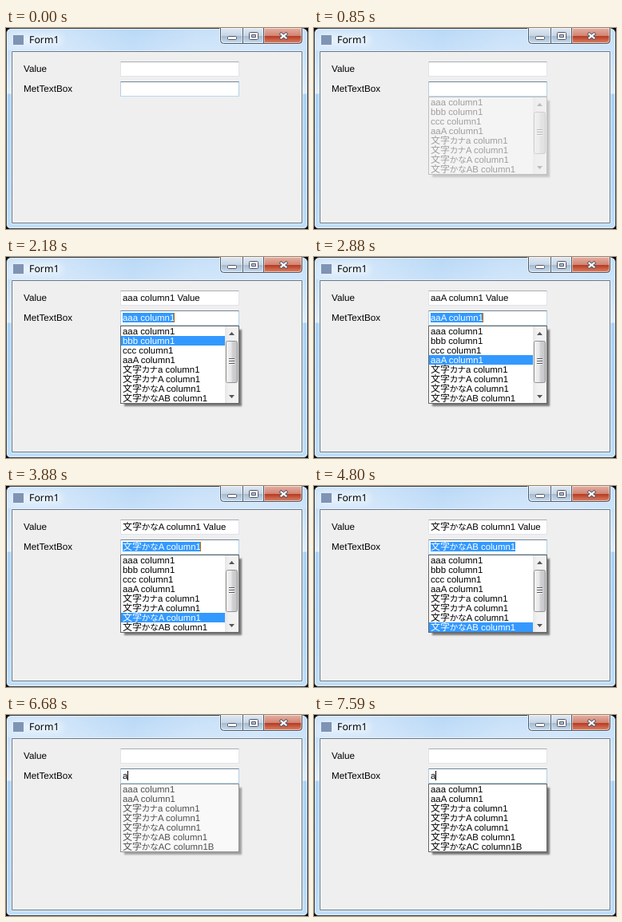
These frames come from a looping animation (378 by 252 pixels, 8 s). An HTML page with a canvas:

```html
<!DOCTYPE html>
<html lang="ja">
<head>
<meta charset="utf-8">
<title>Form1</title>
<style>
html, body { margin: 0; width: 100%; height: 100%; overflow: hidden; background: #000; }
body {
  position: relative;
  font: 11.4px/14px "Liberation Sans", "Noto Sans CJK JP", sans-serif;
  color: #000;
  text-rendering: geometricPrecision;
}
body > *, #bar, #caret { position: absolute; }
canvas { display: block; }
div { white-space: pre; }
.kanji, .kana {
  font: 12px/0 "Noto Sans CJK JP", "Noto Sans CJK", sans-serif;
  font-feature-settings: "palt";
}
.kana { font-size: 10.6px; }
#win { left: 0; top: 0; }
#title { left: 29px; top: 7px; font: 12.3px/16px "Noto Sans", sans-serif; }
.label { left: 22px; font-size: 11.7px; }
.box {
  left: 143px; width: 149px; height: 19px; box-sizing: border-box;
  background: #fff; border: 1px solid #e2e3ea; border-top-color: #abadb3; border-radius: 1px;
}
.box.focus { border-color: #71879c #b5cfe7 #b7d9ed; }
.text { left: 146px; height: 12px; }
.on { background: #39f; color: #fff; }
#caret { top: 0; width: 1px; height: 12px; background: #000; }
.on #caret { right: 0; background: #c60; }
#popup {
  left: 143px; top: 86px; width: 147px; border: 1px solid #646464;
  background: #fff; box-shadow: 4px 4px 2px -1px rgba(0, 0, 0, .5);
}
.row { height: 12px; padding-left: 2px; }
.long .row { margin-right: 17px; }
#bar { right: 0; top: 0; }
</style>
</head>
<body>
<canvas id="win" width="378" height="252"></canvas>
<div id="title">Form1</div>
<div class="label" style="top:45px">Value</div>
<div class="label" style="top:70px">MetTextBox</div>
<div class="box" style="top:42px"></div>
<div class="box focus" style="top:67px"></div>
<div class="text" id="value" style="top:45px"></div>
<div class="text" id="field" style="top:70px"><span id="typed"></span><i id="caret"></i></div>
<div id="popup"><div id="rows"></div><canvas id="bar" width="17" height="96"></canvas></div>
<script>
const LOOP = 8000;
const ITEMS = ['aaa', 'bbb', 'ccc', 'aaA', '文字カナa', '文字カナA', '文字かなA', '文字かなAB']
  .map(s => s + ' column1').concat('文字かなAC column1B');
const MATCHES = ITEMS.filter(s => /^aa|^文/.test(s));

const BLINK = [400, 850, 1420, 4800, 5290, 6120, 6580, 7130, 7590];
const PICK = [1780, 2180, 2480, 2800, 3280, 3580, 3880, 4290];
const FILL = [1780, 2260, 2480, 2880, 3280, 3580, 3880, 4290];
const OPEN = 850, CLOSE = 4880, CLEAR = 5670, TYPE = 6580;

const $ = id => document.getElementById(id);
const passed = (times, t) => times.filter(x => x <= t).length;
const markup = s => s
  .replace(/[\u4e00-\u9fff]+/g, '<span class="kanji">$&</span>')
  .replace(/[\u3040-\u30ff]+/g, '<span class="kana">$&</span>');

function setHtml(el, html) {
  if (el.shown !== html) el.innerHTML = el.shown = html;
}

function ramp(c, x0, y0, x1, y1, ...stops) {
  const g = c.createLinearGradient(x0, y0, x1, y1);
  stops.forEach(([at, color]) => g.addColorStop(at, color));
  return g;
}

function panel(c, x, y, w, h, radii, fill, line) {
  c.beginPath();
  c.roundRect(x + .5, y + .5, w - 1, h - 1, radii);
  c.fillStyle = fill;
  c.fill();
  c.strokeStyle = line;
  c.stroke();
}

function rect(c, color, x, y, w, h) {
  c.fillStyle = color;
  c.fillRect(x, y, w, h);
}

function drawWindow() {
  const c = $('win').getContext('2d');
  const white = a => `rgba(255,255,255,${a})`;
  const glass = ramp(c, 0, 0, 0, 252, [0, '#b9d8f6'], [.12, '#c6e0f9'], [.325, '#e0edfa'],
    [.33, '#abd2f8'], [.8, '#b4d8fa'], [1, '#c0def8']);
  panel(c, 0, 0, 378, 252, [6, 6, 5, 5], glass, '#33414f');
  panel(c, 1, 1, 376, 250, [5, 5, 4, 4], 'transparent', white(.65));

  // slanted sheen and a soft glow behind the caption
  rect(c, ramp(c, 0, 28, 376, 100, [0, white(.3)], [.2, white(.25)], [.4, white(0)],
    [.6, white(.2)], [.8, white(.25)], [1, white(.1)]), 2, 2, 374, 26);
  c.save();
  c.filter = 'blur(5px)';
  rect(c, white(.5), 8, 8, 62, 14);
  c.restore();
  rect(c, '#7f93b3', 9, 9, 13, 12);

  panel(c, 6, 28, 366, 218, 1, 'transparent', white(.6));
  panel(c, 7, 29, 364, 216, 0, '#efefef', '#66788b');

  const pale = ramp(c, 0, 0, 0, 19, [0, '#dfe9f3'], [.53, '#c6d5e4'], [.54, '#a5bacf'], [1, '#c8dcee']);
  const red = ramp(c, 0, 0, 0, 19, [0, '#e5b0a3'], [.53, '#d08371'], [.54, '#b73a22'], [1, '#d98468']);
  const button = (x, w, radii, fill) => {
    panel(c, x, -1, w, 21, radii, fill, '#4b5a6b');
    panel(c, x + 1, 0, w - 2, 19, radii, 'transparent', white(.5));
  };
  panel(c, 267, -1, 105, 22, [0, 0, 5, 5], 'transparent', white(.6));
  button(268, 29, [0, 0, 0, 4], pale);
  button(296, 27, 0, pale);
  button(322, 49, [0, 0, 4, 0], red);

  const ink = '#535666';
  panel(c, 277, 10, 12, 5, 1, '#fff', ink);
  panel(c, 304, 5, 12, 10, 1, '#fff', ink);
  panel(c, 307, 8, 6, 4, 0, '#b4c6d8', ink);
  for (const [color, width] of [[ink, 4], ['#fff', 2.2]]) {
    c.strokeStyle = color;
    c.lineWidth = width;
    c.lineCap = 'square';
    c.beginPath();
    c.moveTo(344.5, 7.5); c.lineTo(350.5, 12.5);
    c.moveTo(350.5, 7.5); c.lineTo(344.5, 12.5);
    c.stroke();
  }
}

function drawBar() {
  const c = $('bar').getContext('2d');
  rect(c, ramp(c, 0, 0, 17, 0, [0, '#e6e6e6'], [.3, '#f1f1f1'], [1, '#f3f3f3']), 0, 0, 17, 96);
  const arrow = (y, dir) => {
    c.fillStyle = '#555';
    c.beginPath();
    c.moveTo(5, y); c.lineTo(12, y); c.lineTo(8.5, y + 4 * dir);
    c.fill();
  };
  arrow(11, -1);
  arrow(86, 1);
  panel(c, 1, 18, 15, 53, 2,
    ramp(c, 1, 0, 16, 0, [0, '#f5f5f5'], [.48, '#e6e6e6'], [.52, '#d3d3d6'], [1, '#c2c3c7']), '#929292');
  for (let y = 40; y < 49; y += 3) {
    rect(c, '#55585e', 5, y, 7, 1);
    rect(c, '#fff', 5, y + 1, 7, 1);
  }
}

function popupOpacity(t) {
  const start = t >= TYPE ? TYPE : OPEN;
  if (t < start || (t >= CLOSE && t < TYPE)) return 0;
  return Math.min(1, (Math.floor((t - start) / 85) + 1) / 3);
}

function render(t) {
  const typing = t >= TYPE;
  const filled = t < CLEAR ? passed(FILL, t) - 1 : -1;
  const active = t < CLOSE ? passed(PICK, t) - 1 : -1;
  const chosen = filled < 0 ? '' : ITEMS[filled];

  setHtml($('value'), chosen && markup(chosen + ' Value'));
  setHtml($('typed'), typing ? 'a' : markup(chosen));
  $('field').classList.toggle('on', !!chosen);
  $('caret').style.visibility = passed(BLINK, t) % 2 ? 'visible' : 'hidden';

  const list = typing ? MATCHES : ITEMS.slice(0, 8);
  setHtml($('rows'), list.map((s, i) =>
    `<div class="row${i === active ? ' on' : ''}">${markup(s)}</div>`).join(''));
  $('popup').classList.toggle('long', !typing);
  $('bar').style.display = typing ? 'none' : 'block';
  $('popup').style.opacity = popupOpacity(t);
}

function tick() {
  render(performance.now() % LOOP);
  requestAnimationFrame(tick);
}

drawWindow();
drawBar();
tick();
</script>
</body>
</html>
```
